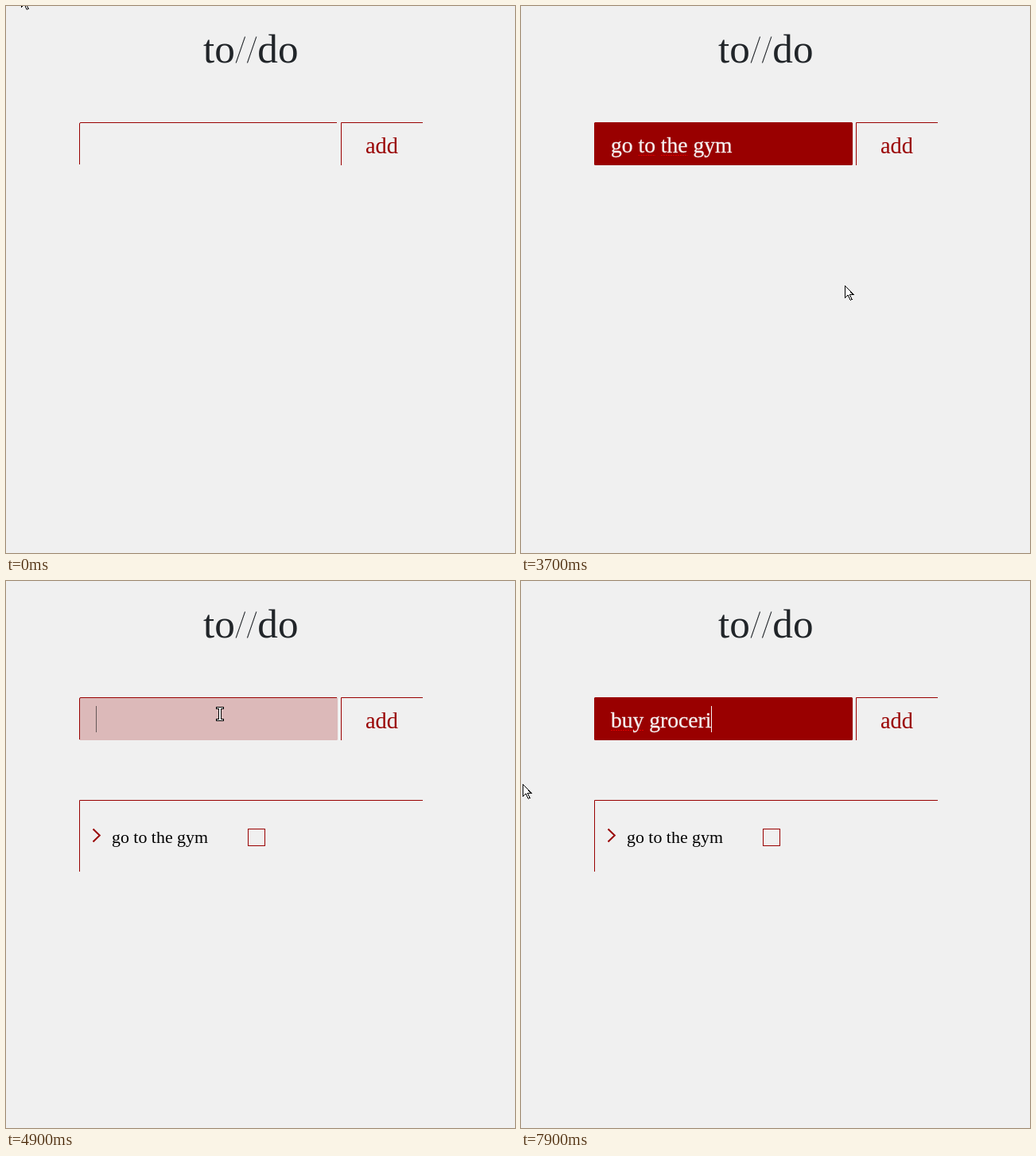
An HTML page that plays this animation: 640 px wide and 687 px high, repeating every 8 s.

```html
<!DOCTYPE html>
<html lang="en">
<head>
<meta charset="utf-8">
<title>to//do</title>
<style>
  html, body { margin: 0; width: 100%; height: 100%; overflow: hidden; background: #f0f0f0; }
  svg { display: block; width: 640px; height: 687px; }
  text { font-family: "Liberation Serif", serif; white-space: pre; stroke-width: .3px; }
  .thin { stroke: #f0f0f0; stroke-width: 1.2px; }
  .line { fill: none; stroke: #990000; }
  .cursor { fill: #fff; stroke: #000; shape-rendering: crispEdges; }
  .hidden { display: none; }
</style>
</head>
<body>
<svg viewBox="0 0 640 687">
  <text x="248" y="70.5" font-size="51.2" fill="#212529">to<tspan class="thin">//</tspan>do</text>

  <rect id="field" x="92" y="146" width="325" height="54" rx="1.5" fill="#990000"/>
  <path class="line" d="M92.5 199V148q0-1.5 1.5-1.5H416"/>
  <path id="squiggle" fill="none" stroke="#e00000" stroke-dasharray="2 1"/>
  <text id="value" x="113" y="184" font-size="27.6"></text>
  <path id="caret"/>

  <path class="line" d="M421.5 200V146.5H524"/>
  <rect id="button" x="421" y="146" width="103" height="54" fill="#990000"/>
  <rect id="selection" x="479" y="146" width="15" height="54" fill="#1e60d2"/>
  <text id="add" x="452" y="185" font-size="28.4">add</text>

  <g id="item">
    <path class="line" d="M92.5 365V275.5H524"/>
    <path class="line" stroke-width="2" d="M109.5 311.5L117.8 319.5L109.5 327.5"/>
    <text x="133" y="328.5" font-size="21.9">go to the gym</text>
    <rect class="line" x="304.5" y="311.5" width="21" height="21"/>
  </g>

  <path id="arrow" class="cursor" d="M.5 .5V15.5L4 12.2L7.2 18.5L9.3 17.5L6.4 11.4H11Z"/>
  <path id="beam" class="cursor" d="M-4.5-8.5H4.5V-6.5H1.5V6.5H4.5V8.5H-4.5V6.5H-1.5V-6.5H-4.5Z"/>
  <path id="hand" class="cursor" d="M-1.5 13V1Q-1.5-.5 0-.5T1.5 1V7Q4 5.5 5 8Q7 7 8 9Q10.5 8.5 10.5 11V16Q10.5 19 8.5 22.5H.5Q-1 19-4.5 14.5Q-6.5 11-4 11Q-2.5 11.5-1.5 13"/>
</svg>

<script>
const LOOP = 8000, STEP = 100, FADE = 300, BLINK = 500, LEFT = 113;
const FOCUS = 620, BLUR = 4300, REFOCUS = 4850;
const HOVER = 3950, SUBMIT = 4500, LEAVE = 4600;
const RED = [153, 0, 0], PALE = [245, 240, 240], DARK = [58, 42, 42];

// bend above 1 starts fast and slows down, below 1 the reverse
const phrases = [
  { text: "go to the gym", start: 1300, end: 3200, bend: 1.22 },
  { text: "buy groceri", start: 6100, end: 7900, bend: .85 }
];
const origin = { x: 19, y: -14 };
const glides = [
  { start: 0, end: 300, x: 248, y: 192 },
  { start: 400, end: 500, x: 234, y: 198 },
  { start: 700, end: 900, x: 433, y: 425 },
  { start: 3600, end: 3700, x: 407, y: 351 },
  { start: 3700, end: 4000, x: 487, y: 179 },
  { start: SUBMIT, end: 4900, x: 269, y: 167 },
  { start: 4900, end: 5100, x: 1, y: 69 },
  { start: 5100, end: 5200, x: -20, y: 255 },
  { start: 5200, end: 5300, x: 2, y: 255 }
];

const $ = id => document.getElementById(id);
const show = (id, on) => $(id).classList.toggle("hidden", !on);
const progress = (t, start, end) => Math.min(1, Math.max(0, (t - start) / (end - start)));
const lerp = (a, b, p) => a + (b - a) * p;
const mix = (a, b, p) => `rgb(${a.map((v, i) => Math.round(lerp(v, b[i], p)))})`;

// Close to the CSS "ease" curve
function fade(t, start) {
  const p = progress(t, start, start + FADE) ** .65;
  return p * p * (3 - 2 * p);
}

const pen = document.createElement("canvas").getContext("2d");
pen.font = '27.6px "Liberation Serif", serif';
const width = text => pen.measureText(text).width;

function tint(id, color) {
  $(id).setAttribute("fill", color);
  $(id).setAttribute("stroke", color);
}

function typed(t) {
  const { text, start, end, bend } = phrases[t < SUBMIT ? 0 : 1];
  if (t < start) return { text: "", key: 0 };
  const last = text.length - 1;
  const i = Math.floor(progress(t, start, end) ** (1 / bend) * last);
  return { text: text.slice(0, i + 1), key: lerp(start, end, (i / last) ** bend) };
}

function drawField(t) {
  const fill = fade(t, FOCUS) - fade(t, BLUR) + fade(t, REFOCUS);
  const { text, key } = typed(t);
  $("field").setAttribute("opacity", fill);
  $("value").textContent = text;
  tint("value", mix(RED, PALE, fill));

  const marks = [...text.matchAll(/\b(to|the|buy)(?= )/g)].map(word => {
    const x = LEFT + width(text.slice(0, word.index));
    return `M${x} 187.5h${width(word[0])}`;
  });
  $("squiggle").setAttribute("d", marks.join(""));
  show("squiggle", fill === 1);

  const focus = t < BLUR ? FOCUS : REFOCUS;
  const idle = t - Math.max(focus, key);
  const x = Math.floor(LEFT + width(text)) + .5;
  $("caret").setAttribute("d", `M${x} 157V190`);
  $("caret").setAttribute("stroke", mix(DARK, PALE, fill));
  show("caret", t >= focus && Math.floor(idle / BLINK) % 2 === 0);
}

function drawButton(t) {
  const fill = .93 * (fade(t, HOVER) - fade(t, LEAVE));
  $("button").setAttribute("opacity", fill);
  $("add").setAttribute("fill", mix(RED, PALE, fill));
  show("selection", t > BLUR && t < REFOCUS);
}

function drawCursor(t) {
  let { x, y } = origin;
  for (const glide of glides) {
    const p = progress(t, glide.start, glide.end);
    x = lerp(x, glide.x, p);
    y = lerp(y, glide.y, p);
  }
  const inRow = y >= 146 && y < 200;
  const over = (left, right) => inRow && x >= left && x < right;
  const kind = over(92, 417) ? "beam" : over(421, 524) ? "hand" : "arrow";
  for (const id of ["arrow", "beam", "hand"]) show(id, id === kind);
  $(kind).setAttribute("transform", `translate(${Math.round(x)} ${Math.round(y)})`);
}

function frame() {
  const t = Math.floor(performance.now() % LOOP / STEP) * STEP;
  drawField(t);
  drawButton(t);
  drawCursor(t);
  show("item", t >= SUBMIT);
  requestAnimationFrame(frame);
}
frame();
</script>
</body>
</html>
```
